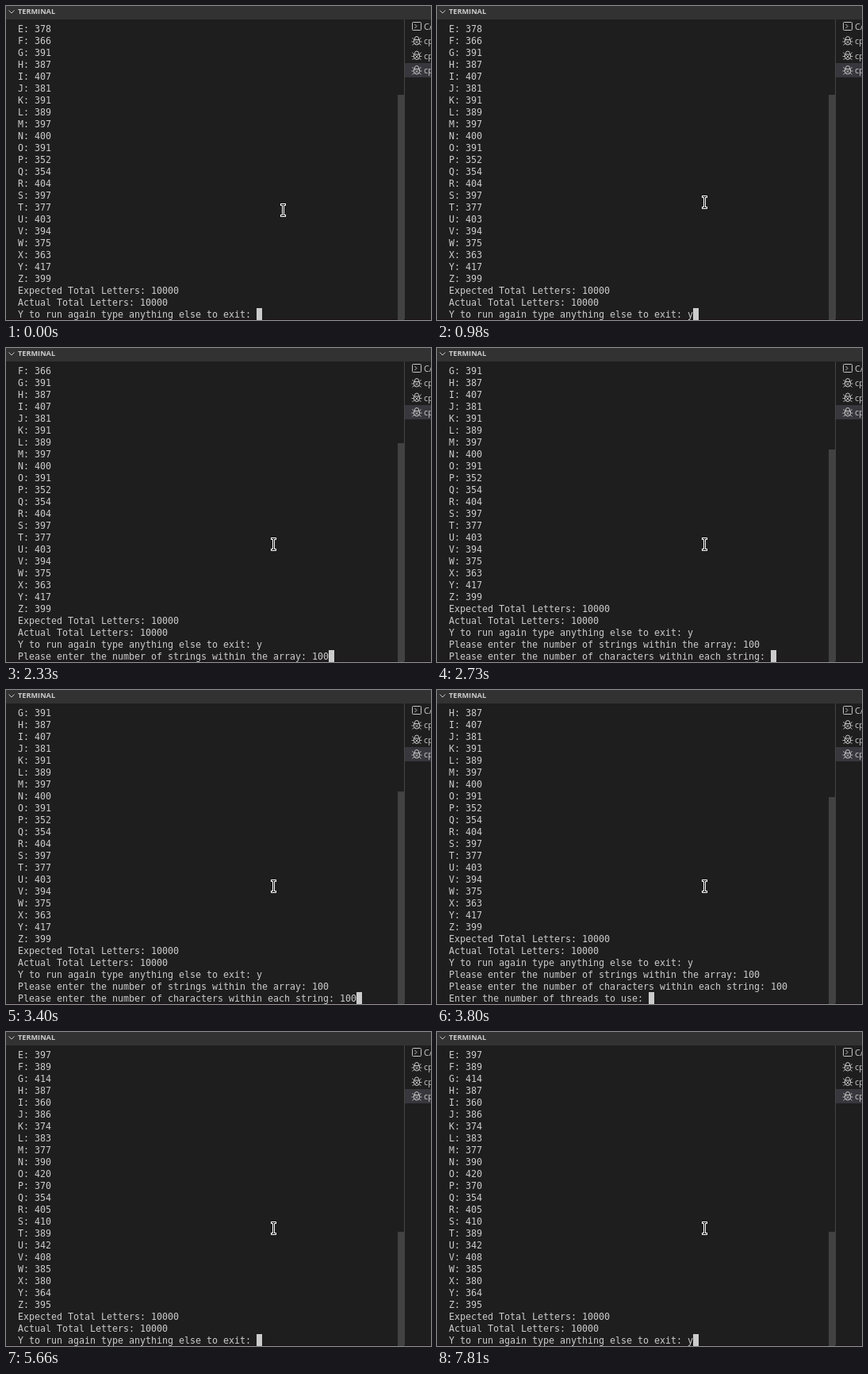
Animation of 536x396 px, one loop 8 s. Source, as an HTML page:

```html
<!DOCTYPE html>
<html lang="en">
<head>
<meta charset="utf-8">
<title>Terminal session</title>
<style>
  html, body { margin: 0; width: 100%; height: 100%; overflow: hidden; background: #1e1e1e; }
  svg { display: block; }
  text { white-space: pre; fill: #ccc; }
  #rows { font: 11.63px "DejaVu Sans Mono", monospace; }
  .title { font: bold 9.17px "Open Sans", sans-serif; }
  .item { font: 10.8px "Open Sans", sans-serif; }
  .line { fill: none; stroke: #c5c5c5; }
</style>
</head>
<body>
<svg width="536" height="396" viewBox="0 0 536 396">
  <defs>
    <g id="bug" class="line">
      <path d="M-3.5 -1.5H3.5V1.5A3.5 3.5 0 0 1 -3.5 1.5ZM-2.5 -1.5V-3A2.5 2.5 0 0 1 2.5 -3V-1.5"/>
      <path d="M-3.5 -1.5L-5.5 -4M3.5 -1.5L5.5 -4M-3.5 1H-6.5M3.5 1H6.5M-3 3L-5.5 5.5M3 3L5.5 5.5M-2 -.5L2 3.5M2 -.5L-2 3.5" stroke-width=".9"/>
    </g>
    <path id="beam" d="M-2 -7H2M0 -7V7M-2 7H2" fill="none" stroke-linecap="square"/>
  </defs>
  <rect width="536" height="396" fill="#1e1e1e"/>
  <rect width="536" height="17" fill="#323233"/>
  <path class="line" d="M3.5 5.5L7 9L10.5 5.5"/>
  <text class="title" x="15" y="10">TERMINAL</text>

  <rect x="503" y="72" width="33" height="18" fill="#37373d"/>
  <rect x="502" y="17" width="1" height="379" fill="#444"/>
  <rect class="line" x="512.5" y="20.5" width="11" height="10" rx="1"/>
  <path class="line" d="M515.5 23L518 25.5L515.5 28"/>
  <text class="item" x="527" y="30">C/</text>
  <g id="items"></g>

  <rect y="395" width="536" height="1" fill="#1a1216"/>
  <rect id="thumb" x="494" width="8" fill="#424242"/>
  <g id="rows"></g>
  <rect id="caret" y="381" width="7" height="15" fill="#ccc"/>
  <g id="pointer">
    <use href="#beam" stroke="#fff" stroke-width="3"/>
    <use href="#beam" stroke="#111" stroke-width="1"/>
  </g>
</svg>
<script>
const LOOP = 8000, ROWS = 25, LEFT = 15, CELL = 7, LEADING = 15;
const $ = id => document.getElementById(id);

const report = counts => [
  ...counts.split(" ").map((n, i) => `${String.fromCharCode(69 + i)}: ${n}`),
  "Expected Total Letters: 10000",
  "Actual Total Letters: 10000",
];
const firstRun = report("378 366 391 387 407 381 391 389 397 400 391 352 354 404 397 377 403 394 375 363 417 399");
const secondRun = report("397 389 414 387 360 386 374 383 377 390 420 370 354 405 410 389 342 408 385 380 364 395");

const again = "Y to run again type anything else to exit: ";
const strings = "Please enter the number of strings within the array: ";
const chars = "Please enter the number of characters within each string: ";
const threads = "Enter the number of threads to use: ";

// Each scene: start time, scrollbar top, finished lines, prompt, typed input over time
const afterAgain = [...firstRun, again + "y"];
const afterStrings = [...afterAgain, strings + "100"];
const afterChars = [...afterStrings, chars + "100"];
const scenes = [
  { at: 0, thumb: 112, done: firstRun, prompt: again, keys: [[980, "y"]] },
  { at: 1250, thumb: 120, done: afterAgain, prompt: strings, keys: [[2210, "10"], [2330, "100"]] },
  { at: 2730, thumb: 128, done: afterStrings, prompt: chars, keys: [[3130, "1"], [3280, "10"], [3400, "100"]] },
  { at: 3800, thumb: 135, done: afterChars, prompt: threads, keys: [[4670, "5"]] },
  { at: 5660, thumb: 252, done: secondRun, prompt: again, keys: [[7810, "y"]] },
];
const pointerSteps = [[0, 349.5, 257.5], [430, 341.5, 250.5], [550, 337.5, 247.5]];

$("items").innerHTML = [44, 62.5, 81].map(y =>
  `<use href="#bug" x="518" y="${y}"/><text class="item" x="527" y="${y + 4}">cpp</text>`).join("");

const rows = Array.from({ length: ROWS }, (_, i) => {
  const row = document.createElementNS("http://www.w3.org/2000/svg", "text");
  row.setAttribute("x", LEFT);
  row.setAttribute("y", 33 + i * LEADING);
  return $("rows").appendChild(row);
});

function render(t) {
  const scene = scenes.findLast(s => s.at <= t);
  const key = scene.keys.findLast(k => k[0] <= t);
  const input = scene.prompt + (key ? key[1] : "");
  const lines = [...scene.done, input].slice(-ROWS);
  rows.forEach((row, i) => {
    if (row.textContent !== lines[i]) row.textContent = lines[i];
  });
  $("caret").setAttribute("x", LEFT + input.length * CELL);
  $("thumb").setAttribute("y", scene.thumb);
  $("thumb").setAttribute("height", 396 - scene.thumb);
  const [, x, y] = pointerSteps.findLast(p => p[0] <= t);
  $("pointer").setAttribute("transform", `translate(${x} ${y})`);
}

const start = performance.now();
function tick() {
  render((performance.now() - start) % LOOP);
  requestAnimationFrame(tick);
}
tick();
</script>
</body>
</html>
```
